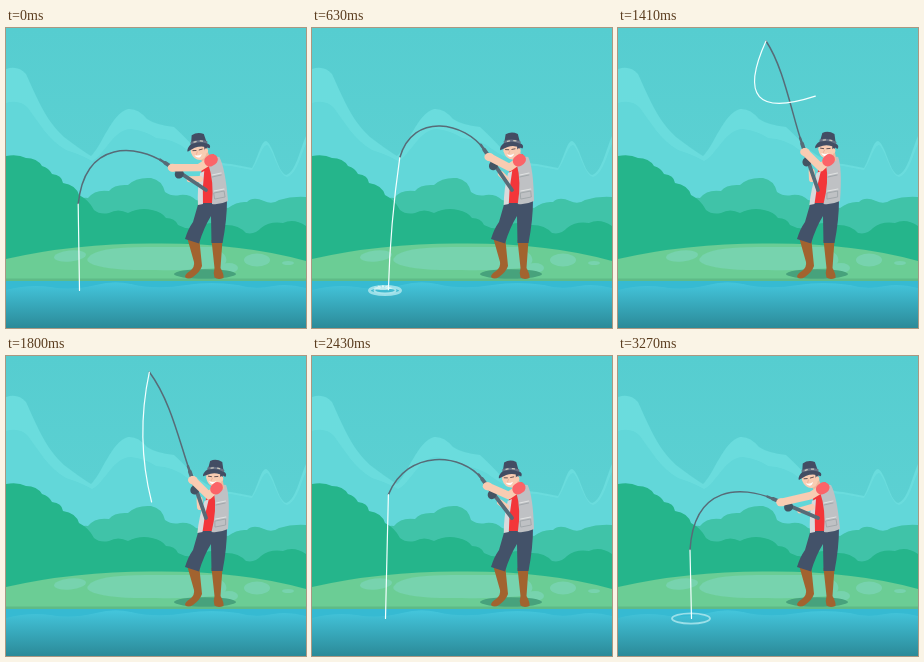
Recreate the animation shown at these times as an HTML page with a canvas. Size 300 px wide and 300 px high, loop 3.3 s.

```html
<!DOCTYPE html>
<html lang="en">
<head>
<meta charset="utf-8">
<title>Angler</title>
<style>
html, body { margin: 0; width: 100%; height: 100%; overflow: hidden; background: #57cdd0; }
canvas { display: block; width: 300px; height: 300px; }
</style>
</head>
<body>
<canvas id="stage"></canvas>
<script>
const canvas = document.getElementById('stage');
const ctx = canvas.getContext('2d');
const dpr = window.devicePixelRatio || 1;
canvas.width = canvas.height = 300 * dpr;

const LOOP = 3300, STEP = 30;
const SKIN = '#f9ccb2', SLEEVE = '#fb6468', SHIRT = '#f3363a', VEST = '#bfc1c4';
const BOOT = '#a2632f', ROD = '#576b77', HAT = '#434d63', PATCH = '#77d3ae';
const BUTT = { x: 200, y: 162 };
const HOOK = { x: 73.5, y: 262.5 };

const mix = (a, b, p) => a + (b - a) * p;
const between = (a, b, p) => ({ x: mix(a.x, b.x, p), y: mix(a.y, b.y, p) });
const ramp = (t, from, to) => Math.min(1, Math.max(0, (t - from) / (to - from)));
const hump = p => Math.sin(p * Math.PI);
const at = p => `${p.x} ${p.y} `;

function fill(color, d) {
  ctx.fillStyle = color;
  ctx.fill(new Path2D(d));
}

function stroke(color, width, d) {
  ctx.strokeStyle = color;
  ctx.lineWidth = width;
  ctx.stroke(new Path2D(d));
}

function oval(color, x, y, rx, ry, turn = 0) {
  ctx.fillStyle = color;
  ctx.beginPath();
  ctx.ellipse(x, y, rx, ry, turn, 0, Math.PI * 2);
  ctx.fill();
}

function gradient(y0, y1, c0, c1) {
  const g = ctx.createLinearGradient(0, y0, 0, y1);
  g.addColorStop(0, c0);
  g.addColorStop(1, c1);
  return g;
}

// The rod is raised steadily, held up, then lowered ever faster.
function rodPose(t) {
  const fall = ramp(t, 1650, 2760);
  const lift = Math.min(1, 0.22 + 0.78 * t / 1080) - fall ** 2.7;
  const bend = lift ** 4;
  const sway = 8 * hump(fall);
  const angle = (23 + 48 * lift) * Math.PI / 180;
  const reach = r => ({ x: BUTT.x - r * Math.cos(angle), y: BUTT.y - r * Math.sin(angle) });
  const x = 72 + 76 * bend;
  const y = 194 - 181 * (0.45 * lift + 0.55 * lift ** 6);
  return {
    grip: reach(49),
    c1: reach(82),
    c2: { x: x + 4 + 14 * lift, y: y - 66 + 93 * bend + sway },
    tip: { x: x - sway, y },
    lean: 17 * lift * lift
  };
}

// In the air the line makes one turn around the tip and bulges as it snaps back.
function linePath(t, tip) {
  const turn = 2 * Math.PI / (1 + Math.exp((1205 - t) / 101));
  const snap = Math.exp(-(((t - 1410) / 75) ** 2));
  const length = 130 - 56 * snap;
  const free = { x: tip.x - length * Math.sin(turn), y: tip.y + length * Math.cos(turn) };
  const end = between(HOOK, free, ramp(t, 540, 900) - ramp(t, 2190, 2430));
  const bulge = 15 * hump(ramp(t, 540, 2190)) + 41 * snap;
  const dx = end.x - tip.x, dy = end.y - tip.y, len = Math.hypot(dx, dy);
  const control = p => ({
    x: tip.x + dx * p - dy / len * bulge,
    y: tip.y + dy * p + dx / len * bulge
  });
  return `M${at(tip)}C${at(control(1 / 3))}${at(control(2 / 3))}${at(end)}`;
}

function scenery() {
  ctx.fillStyle = gradient(0, 200, '#56cdd0', '#5ed2d3');
  ctx.fillRect(0, 0, 300, 300);
  fill('#6adcdd', 'M0 41Q12 37 20 46C32 72 39 91 58 109Q75 122 85 128C96 118 105 86 122 81Q132 80 141 91Q150 97 168 99Q178 108 190 121Q210 136 225 136L246 140C252 130 255 113 260 113C267 115 272 145 280 147C290 144 294 121 300 108V220H0Z');
  fill('#62d7d9', 'M0 75Q14 71 22 80C32 93 42 112 60 122Q76 127 86 133C98 128 107 101 125 101Q140 103 150 110Q168 111 180 121Q205 138 225 138L246 142C253 132 256 117 261 117C267 120 272 147 281 149C291 146 295 126 300 116V220H0Z');
  fill('#40c3a8', 'M60 190Q68 168 82 170Q89 161 103 163Q108 156 122 157Q130 149 145 150Q156 152 159 164Q166 169 174 167Q184 166 190 172L222 180Q231 173 241 174Q247 168 258 173Q266 177 273 172Q286 168 300 169V230H60Z');
  fill('#25b58b', 'M0 128Q12 126 20 130Q31 130 36 138Q43 140 46 146Q56 147 57 155Q70 157 73 167Q83 172 88 182Q94 187 103 185Q112 180 122 185Q134 179 146 182Q156 184 160 190Q169 190 172 197Q181 202 190 200Q204 192 218 197Q232 196 240 205Q249 207 255 200Q264 193 277 195Q288 190 300 198V240H0Z');
  fill('#6bcd95', 'M0 231Q70 215 150 215.5Q236 215 300 233V256H0Z');
  fill(PATCH, 'M83 229Q90 219 140 219H207Q228 229 216 239Q185 243 150 242Q98 243 84 235Q79 232 83 229Z');
  oval(PATCH, 64, 228, 16, 5.5, -0.1);
  oval(PATCH, 223, 240, 9, 5);
  oval(PATCH, 251, 232, 13, 6.5);
  oval(PATCH, 282, 235, 6, 2);
  fill('#5fbb87', 'M0 250.5H300V256H0Z');
  ctx.fillStyle = gradient(256, 300, '#43c4da', '#2b8a98');
  ctx.fillRect(0, 253, 300, 47);
  fill('#36bad2', 'M0 253H300V260Q282 255 267 258Q249 262 232 257Q205 253 180 257Q150 262 125 256Q108 252 90 257Q65 263 45 259Q22 256 0 262Z');
}

function ring(rx, width, alpha) {
  ctx.globalAlpha = alpha;
  ctx.strokeStyle = '#a6e4ec';
  ctx.lineWidth = width;
  ctx.beginPath();
  ctx.ellipse(73, 262.5, rx, rx * 0.27, 0, 0, Math.PI * 2);
  ctx.stroke();
  ctx.globalAlpha = 1;
}

function ripples(t) {
  for (const start of [30, 570, 2430, 2970]) {
    const p = (t - start) / 540;
    if (p <= 0 || p >= 1) continue;
    const strong = start < 1000;
    const rx = 27 * p ** (strong ? 0.25 : 0.6);
    const alpha = Math.min(1, (1 - p) * 3);
    ring(rx, strong ? 2.8 : 1.9, alpha * 0.9);
    if (strong) ring(rx * 0.68, 1.8, alpha);
  }
}

function splash(t) {
  const size = Math.min(1, hump(ramp(t, 600, 1100)) * 1.16);
  if (size < 0.01) return;
  ctx.save();
  ctx.translate(71, 261);
  ctx.scale(0.6 + 0.4 * size, size);
  oval('#d5f3f4', 0, 0, 10, 4);
  for (let i = 0; i < 7; i++) {
    const a = -2.9 + i * 0.44;
    const reach = 9 + 3 * hump(i / 6);
    oval('#daf5f5', Math.cos(a) * reach, Math.sin(a) * reach, 5.5, 1.8, a);
  }
  ctx.restore();
}

function legs() {
  oval('#47a27c', 199, 246, 31, 4.8);
  fill(BOOT, 'M181.5 211L193.5 213L196 238Q194 244 187 249Q182 252 179 249Q179 246 184 243Q189 239 188 234Z');
  fill(BOOT, 'M205.5 212H216.5L214.5 240Q218 246 217.5 250Q212 252 208.5 249.5Q207 245 208.5 240Z');
  fill('#435269', 'M193 173L221 172Q221 192 216.5 215H205.5L205 188Q198 199 193 215.5L179 211Q182 201 187 194Z');
}

function torso(skew) {
  ctx.save();
  ctx.transform(1, 0, -skew, 1, skew * 173, 0);
  fill(SHIRT, 'M195 139L207 126Q213 132 211 175L196 175Z');
  fill('#d9d9db', 'M194 145L198 143Q196 160 197 176L192 177Q191 160 194 145Z');
  fill(VEST, 'M202 136Q207 127 213 129Q219 140 222 173Q214 177 206 176Q208 153 202 136Z');
  stroke('#9ca3a6', 0.8, 'M206 149L215 147M208 165L218 163L219 169L209 171Z');
  stroke('#e0e2e2', 1, 'M206 147L215 145M208 163L218 161');
  ctx.restore();
}

function head(lean) {
  ctx.save();
  ctx.translate(191 + lean, 119.5 - lean * 0.09);
  ctx.rotate(-0.12 + lean * 0.012);
  ctx.scale(1.06, 1.06);
  fill('#efb99d', 'M0 6L8 2L11 13L3 15Z');
  fill(SKIN, 'M-7 -1H8Q9 10 2 12Q-5 12 -7 4Z');
  fill(HAT, 'M6 -2H9L8 5L6 3Z');
  oval(SKIN, 7.5, 4, 1.8, 2.4);
  stroke('#504346', 0.8, 'M-5 2.5L-2 2.7M1 2.5L4 2');
  stroke('#e8ab90', 0.7, 'M-1 4L-2 6.4');
  fill('#ffffff', 'M-4 7Q0 8.5 3 6.5Q2 10 -1 9.5Q-3 9 -4 7Z');
  fill(HAT, 'M-6 -4L-4.5 -12Q1 -15 7 -12L9 -3Q13 -1 11 2Q4 -2 -3 0L-10 3Q-11 0 -6 -4Z');
  stroke('#677084', 2.2, 'M-5.5 -4.8Q2 -7 8.5 -4');
  stroke('#c9c6bb', 1.2, 'M-3 -5.3L-1 -5.7M3 -5.8L5 -5.4');
  ctx.restore();
}

function angler({ grip, c1, c2, tip, lean }) {
  const hand = between(grip, BUTT, 0.18);
  const reel = between(grip, BUTT, 0.37);
  const shoulder = { x: 206 + lean * 0.32, y: 131.5 };
  const elbow = { x: 193 + lean * 0.58, y: 139.5 };

  legs();
  torso(lean * 0.4 / 42);
  stroke(SKIN, 6, `M194 151L${at(between(grip, BUTT, 0.6))}`);
  head(lean);

  stroke(ROD, 1.5, `M${at(grip)}C${at(c1)}${at(c2)}${at(tip)}`);
  stroke(ROD, 2.4, `M${at(between(grip, c1, 0.18))}L${at(grip)}`);
  stroke(ROD, 3.8, `M${at(grip)}L${at(BUTT)}`);
  oval('#435463', reel.x - 1, reel.y + 1, 4.4, 4.8, 0.6);

  stroke(SKIN, 7.5, `M${at(shoulder)}L${at(elbow)}L${at(hand)}`);
  oval(SKIN, hand.x, hand.y, 4.8, 4);
  stroke(SLEEVE, 11, `M${at(shoulder)}L${at(between(shoulder, elbow, 0.2))}`);
}

function draw(t) {
  ctx.setTransform(dpr, 0, 0, dpr, 0, 0);
  ctx.lineCap = ctx.lineJoin = 'round';
  const rod = rodPose(t);
  scenery();
  ripples(t);
  splash(t);
  angler(rod);
  stroke('#f4ffff', 1.2, `M${at(rod.tip)}` + linePath(t, rod.tip));
}

const begin = performance.now();

function tick() {
  const t = (performance.now() - begin) % LOOP;
  draw(Math.floor(t / STEP) * STEP);
  requestAnimationFrame(tick);
}
tick();
</script>
</body>
</html>
```
